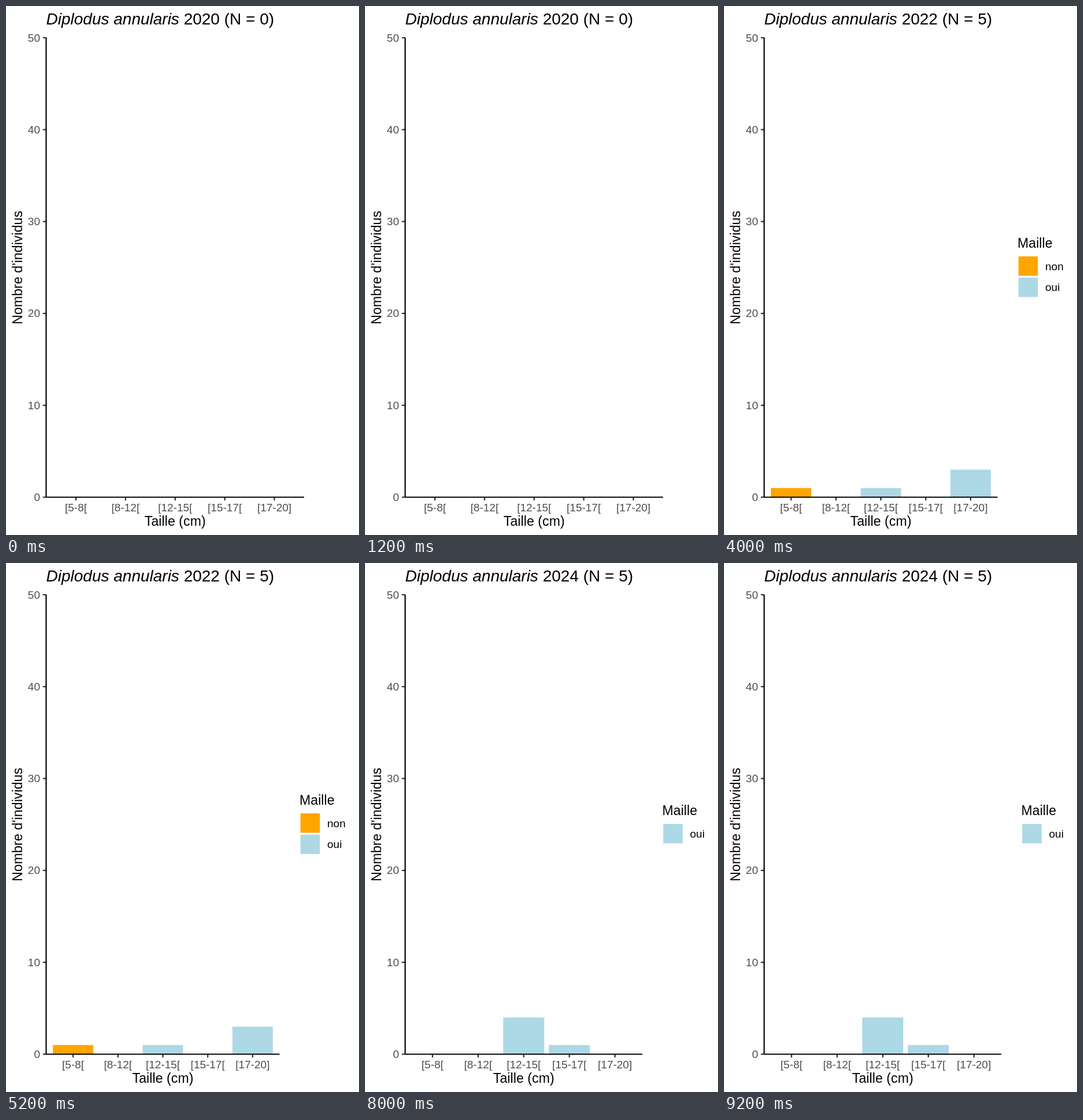
These frames come from a looping animation (611 px wide and 917 px high, 10000 ms). An HTML page:

```html
<!DOCTYPE html>
<html lang="fr">
<head>
<meta charset="utf-8">
<style>
html, body { margin: 0; width: 100%; height: 100%; overflow: hidden; background: #fff; }
svg { display: block; font-family: "Liberation Sans", Arial, sans-serif; }
.title { font-size: 28px; }
.label { font-size: 23px; letter-spacing: .1px; }
.tick, .key { font-size: 19px; }
.tick { fill: #4d4d4d; }
.axis { stroke: #000; stroke-width: 2.2; }
.mark { stroke: #333; stroke-width: 2.2; }
</style>
</head>
<body>
<svg id="chart" width="611" height="917" viewBox="0 0 611 917"></svg>
<script>
const LEFT = 69.5, TOP = 55, BOTTOM = 851.5, UNIT = (BOTTOM - TOP) / 50;
const HOLD = 2000;
const sizes = ["[5-8[", "[8-12[", "[12-15[", "[15-17[", "[17-20]"];
const colors = { non: "#ffa500", oui: "#add8e6" };
const years = [
  { year: 2020, right: 516, counts: [0, 0, 0, 0, 0], keys: [] },
  { year: 2021, right: 480, counts: [0, 0, 28, 6, 1], keys: ["oui"] },
  { year: 2022, right: 473.5, counts: [1, 0, 1, 0, 3], keys: ["non", "oui"] },
  { year: 2023, right: 473.5, counts: [0, 50, 34, 15, 2], keys: ["non", "oui"] },
  { year: 2024, right: 480, counts: [0, 0, 4, 1, 0], keys: ["oui"] }
];

const rect = (x, y, w, h, fill) =>
  `<rect x="${x}" y="${y}" width="${w}" height="${h}" fill="${fill}"/>`;
const line = (x1, y1, x2, y2, cls) =>
  `<line x1="${x1}" y1="${y1}" x2="${x2}" y2="${y2}" class="${cls}"/>`;
const text = (x, y, str, cls, anchor = "start", extra = "") =>
  `<text x="${x}" y="${y}" class="${cls}" text-anchor="${anchor}" ${extra}>${str}</text>`;

function legend(keys) {
  if (!keys.length) return "";
  const x = keys.length > 1 ? 508.5 : 515;
  const y = 470.8 - 18.4 * keys.length;
  return text(x - 0.5, y - 15.2 + 0.2, "Maille", "label") + keys.map((key, i) => {
    const top = y + 36.8 * i;
    return rect(x + 1.2, top, 33.6, 33.6, colors[key]) + text(x + 47.5, top + 23.5, key, "key");
  }).join("");
}

function draw({ year, right, counts, keys }) {
  const total = counts.reduce((a, b) => a + b);
  const band = (right - LEFT) / 5.2;
  let bars = "", axes = "";

  counts.forEach((n, i) => {
    const x = LEFT + band * (i + 0.6);
    const h = n * UNIT;
    // The two smallest size classes are below the legal size.
    if (n) bars += rect(x - band * 0.45, BOTTOM - h, band * 0.9, h, colors[i < 2 ? "non" : "oui"]);
    axes += line(x, BOTTOM, x, BOTTOM + 5.7, "mark") + text(x, 875.5, sizes[i], "tick", "middle");
  });
  for (let n = 0; n <= 50; n += 10) {
    const y = BOTTOM - n * UNIT;
    axes += line(LEFT - 5.7, y, LEFT, y, "mark") + text(59, y + 6.5, n, "tick", "end");
  }
  axes += line(LEFT, TOP, LEFT, BOTTOM, "axis") + line(LEFT, BOTTOM, right, BOTTOM, "axis");

  return bars + axes + legend(keys) +
    text(LEFT, 32, `<tspan font-style="italic">Diplodus annularis</tspan> ${year} (N = ${total})`, "title") +
    text((LEFT + right) / 2, 901, "Taille (cm)", "label", "middle") +
    text(0, 0, "Nombre d'individus", "label", "middle", 'transform="translate(28 453.3) rotate(-90)"');
}

const chart = document.getElementById("chart");
const start = performance.now();
let shown = -1;

function tick() {
  const i = Math.floor((performance.now() - start) / HOLD) % years.length;
  if (i !== shown) chart.innerHTML = draw(years[shown = i]);
  requestAnimationFrame(tick);
}
tick();
</script>
</body>
</html>
```
